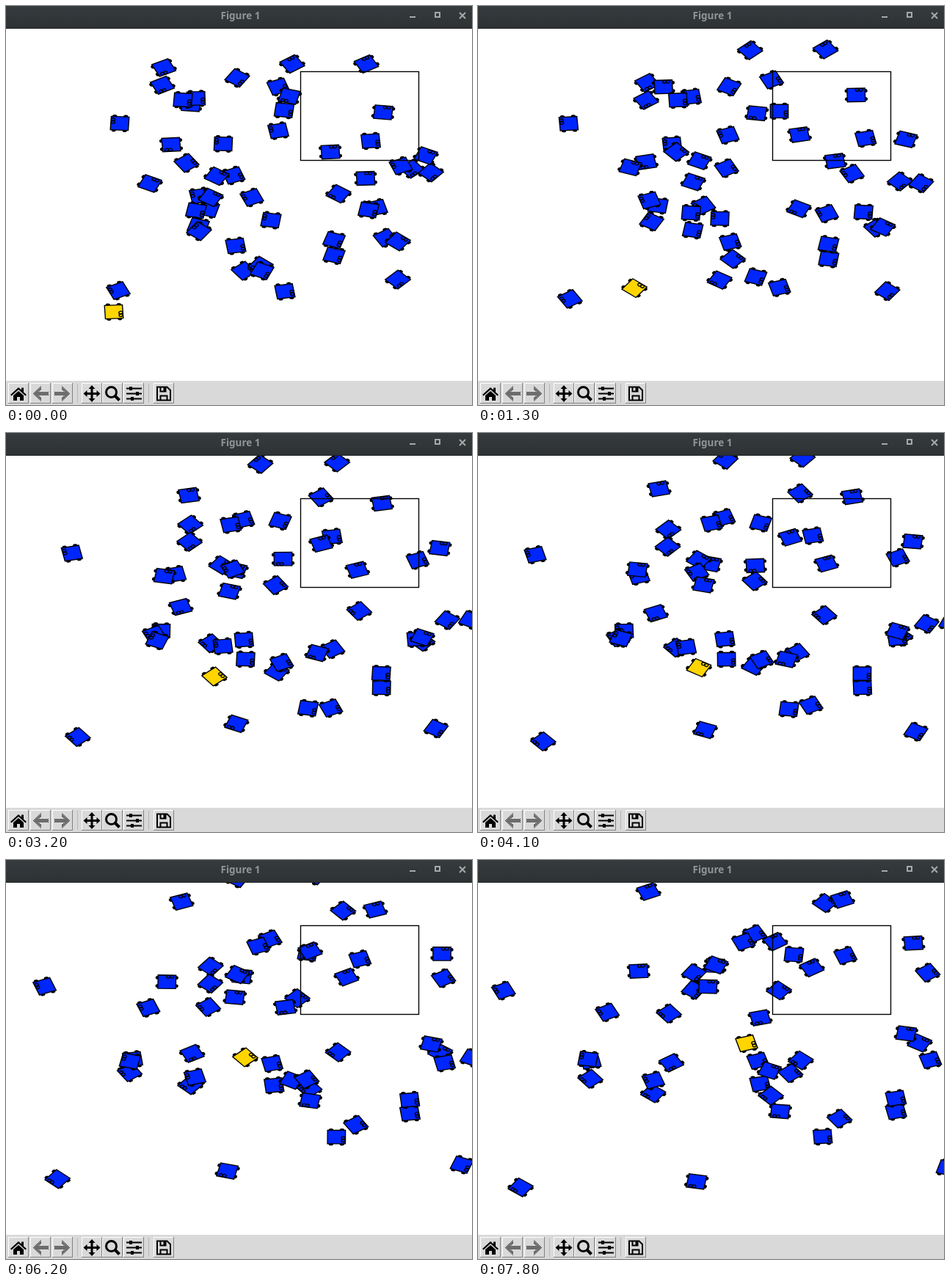
Animation of 635 by 544 pixels, one loop 8 s. Source, as an HTML page with a canvas:

```html
<!DOCTYPE html>
<html lang="en">
<head>
<meta charset="utf-8">
<title>Figure 1</title>
<style>
html, body { margin: 0; width: 635px; height: 544px; overflow: hidden; background: #fff; }
canvas, svg { position: absolute; left: 0; top: 0; display: block; }
</style>
</head>
<body>
<canvas id="plot" width="635" height="544"></canvas>
<svg width="635" height="544" viewBox="0 0 635 544">
  <defs>
    <linearGradient id="bar" x2="0" y2="1">
      <stop stop-color="#363b3e"/><stop offset="1" stop-color="#2e3235"/>
    </linearGradient>
    <pattern id="dots" width="2" height="2" patternUnits="userSpaceOnUse">
      <path d="M0 0h1v1h-1zM1 1h1v1h-1z" shape-rendering="crispEdges"/>
    </pattern>
    <g id="button" fill="none" shape-rendering="crispEdges">
      <path d="M.5 27V.5H27" stroke="#fff"/><path d="M27.5 0V27.5H0" stroke="#828282"/>
    </g>
    <path id="arrow" d="M11 518l-11 10.500 11 10.500v-5l-4-3h14v-5h-14l4-3z"/>
  </defs>
  <rect width="635" height="30" fill="url(#bar)"/>
  <rect y="30" width="635" height="1" fill="#1f2224"/>
  <text x="319.500" y="18" text-anchor="middle" fill="#919594" font-family="'Noto Sans', 'Open Sans', sans-serif" font-weight="700" font-size="13.500">Figure 1</text>
  <g fill="none" stroke="#a5a9a8" stroke-width="2">
    <path d="M550 15h8M618 9l8 8M626 9l-8 8"/><rect x="585" y="9" width="6" height="6"/>
  </g>
  <rect y="511" width="635" height="33" fill="#d9d9d9"/>
  <use href="#button" x="3" y="514"/><use href="#button" x="33" y="514"/><use href="#button" x="63" y="514"/>
  <use href="#button" x="103" y="514"/><use href="#button" x="131" y="514"/><use href="#button" x="160" y="514"/>
  <use href="#button" x="201" y="514"/>
  <path d="M97.500 515v26M194.500 515v26" stroke="#b5b5b5"/>
  <path d="M6 530l11-10 4 3.500v-3h3v6l4 3.500-1.500 1.500-9.500-8.500-9.500 8.500zM10 531l7-6 7 6v7h-5v-5h-4v5h-5z"/>
  <g fill="url(#dots)">
    <use href="#arrow" x="37"/><use href="#arrow" transform="matrix(-1 0 0 1 87 0)"/>
  </g>
  <path d="M117 517l4.500 5h-3v5h5v-3l5 4.500-5 4.500v-3h-5v5h3l-4.500 5-4.500-5h3v-5h-5v3l-5-4.500 5-4.500v3h5v-5h-3z"/>
  <g fill="none" stroke="#000">
    <circle cx="143.500" cy="526.500" r="7" stroke-width="3"/>
    <path d="M148.500 531.500l6 6" stroke-width="4"/>
    <path d="M164 521.500h21M164 528.500h21M164 535.500h21" stroke-width="2"/>
    <path d="M170 519v5M179 526v5M172 533v5" stroke-width="4"/>
    <path d="M206 519.500h13.500l4.500 4.500v13.500h-18z" stroke-width="2"/>
    <path d="M210.500 538v-6.500h9v6.500M210.500 520v5.500h7v-5.500" stroke-width="2"/>
  </g>
  <path d="M214.500 520h3v5h-3z"/>
</svg>
<script>
const ctx = document.getElementById("plot").getContext("2d");
const RAD = Math.PI / 180, ASPECT = 0.751, STEP = 2.43, TURN = 0.56 * RAD;

// simulation steps taken in each 100 ms slot
const TICKS = "01111111110211110111" + "00210110110020100201" + "01010110101010101010" + "10".repeat(10);

// x, y, heading in degrees, back to front
const cars = [
  [215,84,-64], [213,108,-63], [252,134,85], [259,126,1.5], [241,128,-4], [315,98,-34], [390,79,124],
  [491,79,120], [371,110,19.6], [310,231,21], [379,142,-7], [386,123,-105], [155,160,177],
  [225,189,-86], [296,188,178], [287,232,58.5], [246,214,36], [371,170,191], [196,242,65],
  [335,261,204], [361,292,171], [276,277,164], [264,259,191], [279,261,59.5], [259,279,-11],
  [262,300,-17.4], [263,307,143], [324,361,39], [347,354,232], [349,361,-24.4], [380,389,9],
  [153,388,205], [534,373,-45], [447,340,-16], [447,319,-18], [517,316,32], [505,275,196],
  [494,278,-11], [534,321,52], [453,256,236], [313,327,9], [490,235,92.4], [553,222,-50],
  [538,218,202.5], [579,227,-42], [572,204,65.7], [497,184,5], [442,199,93.4], [514,145,84]
];

// step, x, y, heading of the driven car
const route = [
  [0,147,417,3], [7,184,409,40], [18,237,364,43], [27,284,332,40],
  [32,301,320,60], [43,326,269,42], [51,366,250,16]
];

function drawCar(x, y, heading, color) {
  const c = Math.cos(heading), s = Math.sin(heading);
  const trace = add => {
    ctx.save();
    ctx.transform(c, -s * ASPECT, s, c * ASPECT, x, y);
    ctx.beginPath();
    add();
    ctx.restore();
  };
  const ring = (px, py, rx, ry) => trace(() => ctx.ellipse(px, py, rx, ry, 0, 0, 7));
  for (const px of [-7.5, 7.5]) for (const py of [-13, 13]) {
    ring(px, py, 3.2, 2.6);
    ctx.fillStyle = "#000";
    ctx.fill();
  }
  trace(() => ctx.rect(-12.2, -12.2, 24.4, 24.4));
  ctx.fillStyle = color;
  ctx.fill();
  ctx.stroke();
  for (const py of [1.8, 6.6]) {
    ring(9.2, py, 2.5, 2.5);
    ctx.stroke();
  }
}

function drawDriven(n) {
  const i = Math.max(1, route.findIndex(p => p[0] >= n));
  const [n0, x0, y0, h0] = route[i - 1], [n1, x1, y1, h1] = route[i];
  const u = (n - n0) / (n1 - n0), len = Math.hypot(x1 - x0, (y1 - y0) / ASPECT);
  // cubic with the headings as end tangents
  const curve = (a, b, da, db) => {
    const q = 3 * (b - a) - 2 * da - db, r = 2 * (a - b) + da + db;
    return [a + u * (da + u * (q + u * r)), da + u * (2 * q + 3 * u * r)];
  };
  const [x, vx] = curve(x0, x1, len * Math.cos(h0 * RAD), len * Math.cos(h1 * RAD));
  const [y, vy] = curve(-y0 / ASPECT, -y1 / ASPECT, len * Math.sin(h0 * RAD), len * Math.sin(h1 * RAD));
  drawCar(x, -y * ASPECT, Math.atan2(vy, vx), "#ffd500");
}

function draw() {
  const slot = Math.floor(performance.now() % 8000 / 100);
  let n = 0;
  for (let i = 0; i <= slot; i++) n += +TICKS[i];
  ctx.fillStyle = "#fff";
  ctx.fillRect(0, 0, 635, 544);
  ctx.strokeStyle = "#000";
  ctx.lineWidth = 1.39;
  const r = STEP / TURN;
  for (const [x, y, deg] of cars) {
    const h = deg * RAD, end = h + n * TURN;
    drawCar(x + r * (Math.sin(end) - Math.sin(h)), y + ASPECT * r * (Math.cos(end) - Math.cos(h)), end, "#0026ff");
  }
  drawDriven(n);
  ctx.strokeRect(401.5, 89.5, 161, 121);
  requestAnimationFrame(draw);
}
draw();
</script>
</body>
</html>
```
